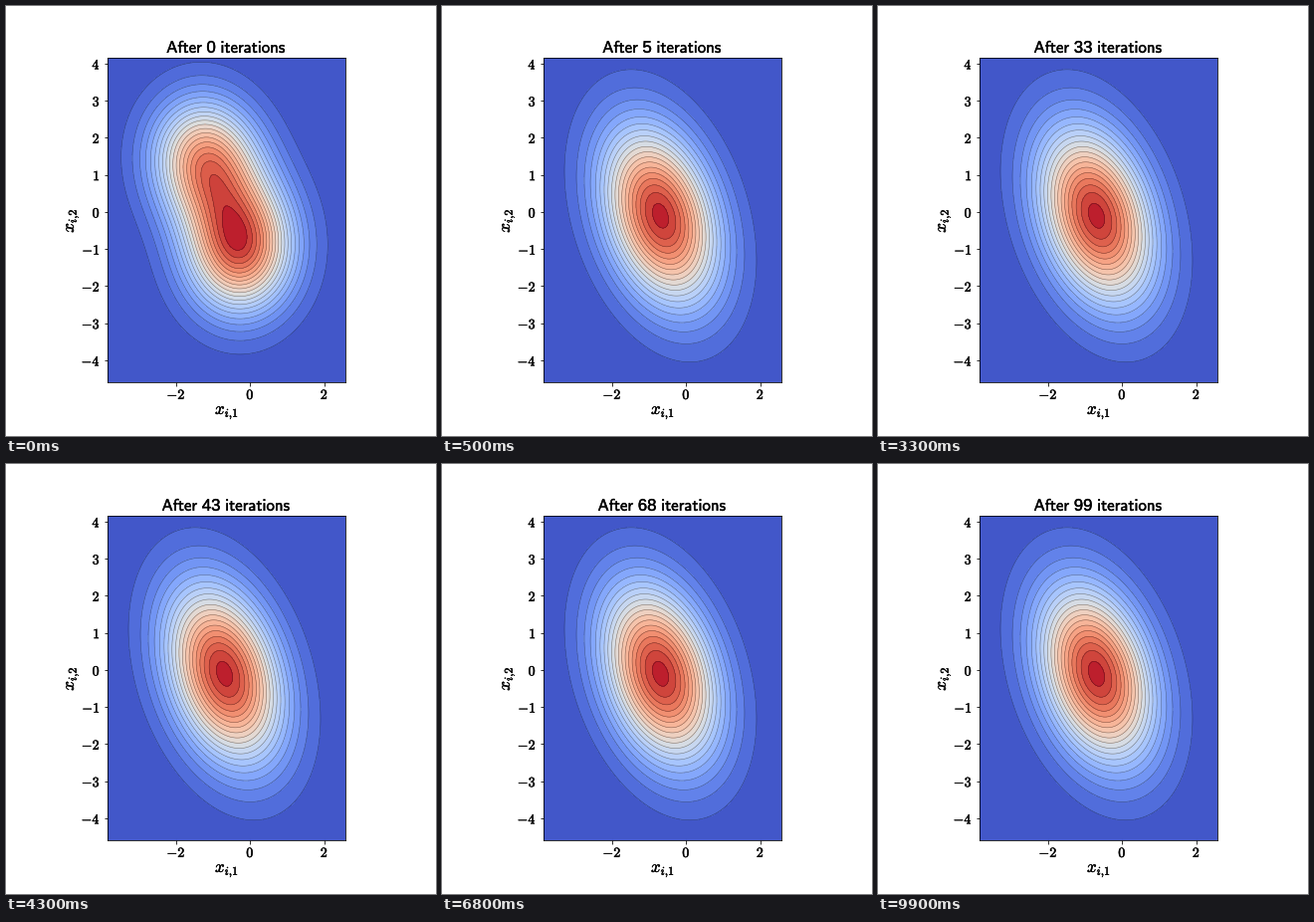
A matplotlib script for the animation above (10000 ms loop, 432 by 432 pixels).

```python
import numpy as np
import matplotlib.pyplot as plt
from matplotlib.animation import FuncAnimation
from matplotlib.patheffects import withStroke

SIZE, DPI = 432, 72
FRAMES, INTERVAL = 100, 100
DECAY = 0.3      # share of the start density left per iteration
SETTLED = 12     # the density no longer changes visibly
HEAVY = [withStroke(linewidth=0.4, foreground="black")]

plt.rcParams.update({"font.size": 14, "font.family": "Liberation Sans",
                     "mathtext.fontset": "cm"})


def gauss(x, y, mx, my, sx, sy, rho):
    u, v = (x - mx) / sx, (y - my) / sy
    c = 1 - rho ** 2
    q = (u * u - 2 * rho * u * v + v * v) / c
    return np.exp(-q / 2) / (2 * np.pi * sx * sy * np.sqrt(c))


def density(k):
    start = (0.445 * gauss(X, Y, -1.195, 1.34, 0.972, 1.149, -0.06)
             + 0.555 * gauss(X, Y, -0.282, -0.915, 0.977, 1.208, 0))
    limit = gauss(X, Y, -0.698, -0.105, 1.063, 1.62, -0.305)
    a = DECAY ** k
    return a * start + (1 - a) * limit


def draw_stage(k):
    z = density(k)
    fill = ax.contourf(X, Y, z, 20, cmap="coolwarm")
    lines = ax.contour(X, Y, z, fill.levels[1:-1], colors="k",
                       linewidths=0.5, alpha=0.5)
    return fill, lines


def px(x, y):
    return x / SIZE, 1 - y / SIZE


fig = plt.figure(figsize=(SIZE / DPI, SIZE / DPI), dpi=DPI, facecolor="white")
left, bottom = px(102, 377.9)
right, top = px(341, 51.9)
ax = fig.add_axes([left, bottom, right - left, top - bottom])

xlim, ylim = (-3.852, 2.564), (-4.591, 4.161)
X, Y = np.meshgrid(np.linspace(*xlim, 180), np.linspace(*ylim, 240))
stages = [draw_stage(k) for k in range(SETTLED + 1)]

ax.set(xlim=xlim, ylim=ylim)
xt, yt = range(-2, 3, 2), range(-4, 5)
ax.set_xticks(xt, [f"${v}$" for v in xt])
ax.set_yticks(yt, [f"${v}$" for v in yt])
ax.tick_params(axis="x", pad=2.5)
label = dict(fontsize=17, ha="center", va="baseline", rotation_mode="anchor")
xlabel = fig.text(*px(222, 410), r"$x_{i{,}1}$", **label)
ylabel = fig.text(*px(68, 215.5), r"$x_{i{,}2}$", rotation=90, **label)
title = ax.set_title("", fontsize=16.8, pad=5)
for text in [xlabel, ylabel, title, *ax.get_xticklabels(), *ax.get_yticklabels()]:
    text.set_path_effects(HEAVY)


def update(k):
    for i, stage in enumerate(stages):
        for artist in stage:
            artist.set_visible(i == min(k, SETTLED))
    # the count sits outside math mode to get sans-serif digits
    title.set_text(rf"$\mathsf{{After}}$ {k} $\mathsf{{iterations}}$")
    return []


anim = FuncAnimation(fig, update, frames=FRAMES, interval=INTERVAL,
                     repeat=True, repeat_delay=0)
plt.show()
```
